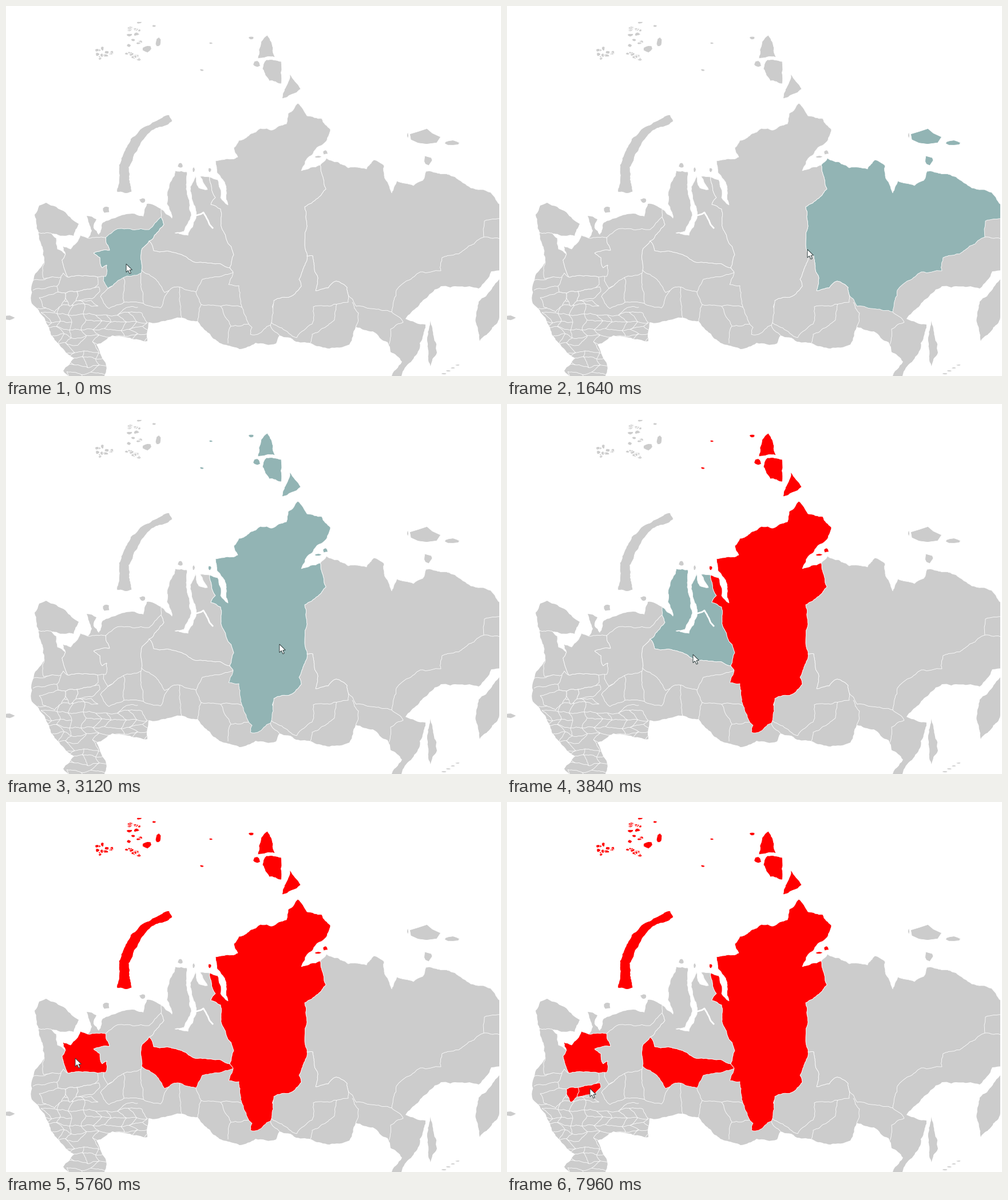
A matplotlib script for the animation above (8000 ms loop, 865x647 px).

```python
import math
import random

import matplotlib.pyplot as plt
import numpy as np
from matplotlib.animation import FuncAnimation
from matplotlib.collections import LineCollection
from matplotlib.patches import PathPatch, Polygon, Rectangle
from matplotlib.path import Path

W, H, STEP, LOOP = 865, 647, 40, 8000
GRAY, TEAL, RED = "#cccccc", "#92b4b4", "#ff0000"
THIN = 0.58

# Coast, clockwise; each arc ends where the next one starts
KOLA = [(57, 396), (50, 365), (58, 349), (70, 344), (104, 361), (127, 381), (118, 402)]
KARELIA_E = [(78, 397), (88, 406), (90, 425)]
WHITE_SEA = [(104, 434), (99, 420), (113, 425), (130, 401)]
NENETS = [(143, 406), (150, 393), (141, 367), (158, 373), (153, 388), (162, 400),
          (169, 379), (220, 363), (240, 368), (246, 346)]
YAMAL_COAST = [(271, 355), (290, 371), (281, 346), (283, 322), (296, 288), (316, 290),
               (315, 320), (324, 366), (311, 394), (295, 397), (318, 401), (332, 371),
               (327, 344), (322, 316), (331, 297), (337, 318), (352, 321), (339, 298)]
YENISEI = [(356, 299), (370, 304), (375, 335), (388, 348), (382, 308), (369, 292)]
TAYMYR = [(366, 271), (405, 264), (398, 248), (407, 235), (445, 214), (465, 217),
          (490, 206), (493, 188), (510, 170), (526, 192), (552, 197), (567, 216),
          (560, 236), (526, 267), (516, 288)]
YAKUT_COAST = [(549, 278), (560, 266), (598, 283), (630, 285), (643, 269), (661, 280),
               (661, 297), (674, 327), (683, 306), (712, 314), (728, 305), (734, 289),
               (775, 295), (812, 318), (847, 326)]
PACIFIC = [(866, 350), (866, 463), (848, 464), (826, 494), (760, 490), (740, 504),
           (698, 547), (733, 557), (722, 601), (690, 650), (672, 650), (692, 622)]
SOUTH = [(672, 605), (667, 588), (641, 569), (611, 561), (600, 592), (565, 599),
         (507, 587), (478, 576), (472, 590), (436, 589), (408, 600), (363, 582),
         (335, 551), (307, 545), (249, 553), (247, 586), (186, 576), (158, 592),
         (174, 624), (172, 650), (112, 650), (100, 638), (119, 616), (85, 584),
         (67, 545), (45, 520)]
FINNISH = [(47, 482), (67, 448)]

# Inner borders
TUNDRA_W = [(356, 299), (366, 335), (358, 347), (375, 355), (376, 380), (398, 435), (391, 458)]
STEPPE_W = [(397, 466), (389, 487), (407, 489), (416, 538), (430, 562), (427, 574),
            (440, 574), (462, 558)]
ANGARA = [(468, 515), (497, 508), (516, 490), (512, 478), (526, 437)]
ANABAR = [(526, 437), (522, 415), (526, 385), (522, 351), (545, 336), (559, 320), (549, 278)]
LENA = [(536, 437), (545, 476), (541, 498), (563, 493), (577, 481), (596, 492)]
BAIKAL = [(598, 505), (598, 518), (565, 525), (537, 526), (535, 556), (508, 580),
          (482, 563), (460, 551)]
STANOVOY = [(866, 370), (836, 376), (835, 404), (800, 427), (762, 440), (760, 463),
            (724, 465), (682, 497), (674, 535), (612, 525), (598, 505)]
OB_N = [(250, 411), (258, 428), (300, 433), (325, 446), (375, 451), (391, 458)]
OB_S = [(397, 466), (343, 478), (332, 500), (300, 491), (277, 501), (262, 478)]
URAL_S = [(237, 462), (238, 424)]
URAL_N = [(250, 411), (276, 382), (271, 369)]
KOMI_W = [(176, 453), (168, 458), (164, 440), (153, 432), (181, 427), (174, 405)]
KOMI_N = [(192, 391), (250, 391)]
KOMI_S = [(236, 467), (212, 472), (178, 494), (170, 480)]
ONEGA = [(98, 444), (104, 434)]
DVINA = [(174, 473), (160, 474), (108, 474)]
VOLOGDA = [(148, 495), (161, 487), (160, 474), (108, 474), (100, 467), (89, 490), (91, 500)]
VOLGA = [(124, 499), (126, 506), (122, 516)]
YAROSLAVL = [(111, 525), (104, 511), (104, 502)]
KOSTROMA = [(150, 512), (164, 499), (162, 491), (148, 495)]
TVER = [(104, 502), (91, 500), (58, 510), (64, 526), (85, 535), (104, 511)]
KIROV = [(178, 494), (205, 474), (206, 518), (180, 529), (165, 508)]
BORDERS = [
    [(47, 480), (100, 467)],
    [(47, 497), (89, 490)],
    [(236, 467), (240, 520), (270, 528), (285, 498)],
    [(206, 518), (240, 520)],
    [(303, 491), (307, 545)],
    [(332, 500), (341, 522), (335, 551)],
    [(341, 522), (375, 525), (414, 527)],
    [(375, 525), (393, 560), (424, 556)],
    [(393, 560), (388, 590)],
    [(462, 558), (478, 576)],
    [(578, 521), (574, 549), (535, 574), (530, 594)],
    [(605, 518), (616, 537), (611, 561)],
    [(674, 535), (694, 553), (672, 565), (667, 597)],
    [(835, 404), (866, 408)],
]
ESTUARY = [(328, 366), (345, 361), (361, 388)]

# Islands
KAMCHATKA = [(870, 472), (826, 517), (821, 545), (828, 586), (858, 555)]
SAKHALIN = [(741, 550), (753, 606), (741, 630), (737, 590)]
NORTH_ISLE = [(457, 51), (470, 90), (440, 92), (446, 62)]
BOLD_ISLE = [(455, 94), (481, 97), (481, 136), (460, 131), (448, 110)]
FAR_ISLE = [(496, 119), (515, 145), (482, 162)]
NOVAYA = np.array([(288, 196, 6), (250, 214, 6), (226, 238, 10), (206, 280, 9), (207, 325, 13)])


def rough(points):
    """Fractal line through the points, the same from either direction."""
    def jag(a, b):
        length = math.dist(a, b)
        if length < 5:
            return [a] if length else []
        (x0, y0), (x1, y1) = sorted((a, b))
        rng = random.Random(x0 * 7919 + y0 * 104729 + x1 * 31 + y1)
        d = min(0.1, 2.2 / length) * rng.uniform(-1, 1)
        mid = ((x0 + x1) / 2 - d * (y1 - y0), (y0 + y1) / 2 + d * (x1 - x0))
        return jag(a, mid) + jag(mid, b)

    return [p for a, b in zip(points, points[1:]) for p in jag(a, b)] + [points[-1]]


def area(*arcs):
    points = [p for arc in arcs for p in arc]
    return Path(rough(points + points[:1]), closed=True)


def islet(x, y, rx, ry):
    rng = random.Random(x * 1000 + y)
    ring = []
    for k in range(9):
        r, a = rng.uniform(0.7, 1.2), k * math.tau / 9
        ring.append((x + r * rx * math.cos(a), y + r * ry * math.sin(a)))
    return Path(ring + ring[:1], closed=True)


def ribbon(spine):
    """Outline of a bent strip given as centre points with half widths."""
    slope = np.gradient(spine[:, :2], axis=0)
    normal = slope[:, ::-1] * (-1, 1) / np.hypot(*slope.T)[:, None]
    side = normal * spine[:, 2:]
    ring = np.vstack([spine[:, :2] + side, (spine[:, :2] - side)[::-1]])
    return area([tuple(p) for p in ring.tolist()])


def scatter(count, x, y, sx, sy, seed):
    rng = random.Random(seed)
    return [islet(x + rng.uniform(-sx, sx), y + rng.uniform(-sy, sy),
                  rng.uniform(2, 6), rng.uniform(2, 4)) for _ in range(count)]


def mesh():
    """Small western provinces as a jittered brick pattern."""
    rng = random.Random(5)
    node = {(i, j): (42 + 22 * i + 11 * (j % 2) + rng.uniform(-5, 5),
                     512 + 13 * j + rng.uniform(-4, 4))
            for i in range(10) for j in range(12)}
    lines = []
    for (i, j), p in node.items():
        if p[0] > 150 and p[1] < 527:
            continue
        for key in ((i + 1, j), (i, j + 1)):
            if key in node and rng.random() < 0.88:
                lines.append(rough([p, node[key]]))
    return lines


land = area(KOLA, KARELIA_E, WHITE_SEA, NENETS, YAMAL_COAST, YENISEI, TAYMYR,
            YAKUT_COAST, PACIFIC, SOUTH, FINNISH)
regions = {
    "kirov": [area(KIROV)],
    "tver": [area(TVER)],
    "karelia": [area(KARELIA_E, ONEGA[::-1], [(108, 474), (66, 477)], FINNISH[1:], KOLA[:1])],
    "komi": [area(KOMI_N, URAL_N[::-1], URAL_S[::-1], KOMI_S, KOMI_W)],
    "yakutia": [area(YAKUT_COAST, PACIFIC[:1], STANOVOY, LENA[::-1], ANABAR),
                islet(731, 229, 25, 14), islet(779, 239, 14, 5), islet(737, 270, 9, 8)],
    "irkutsk": [area(ANGARA, LENA, BAIKAL)],
    "yamal": [area(YAMAL_COAST, TUNDRA_W, OB_N[::-1], URAL_N)],
    "yugra": [area(OB_N, OB_S, URAL_S)],
    "vologda": [area(VOLOGDA, YAROSLAVL[-1:], VOLGA[:1])],
    "yaroslavl": [area(VOLGA, YAROSLAVL)],
    "kostroma": [area(VOLGA, KOSTROMA)],
    "arkhangelsk": [area(WHITE_SEA, NENETS[:1], KOMI_W[::-1], DVINA, ONEGA), ribbon(NOVAYA),
                    islet(266, 64, 6, 8), islet(246, 75, 8, 7), islet(233, 29, 4, 2),
                    islet(259, 35, 4, 2), *scatter(22, 222, 66, 14, 29, 3),
                    *scatter(11, 172, 82, 14, 10, 8)],
    "krasnoyarsk": [area(YENISEI, TAYMYR, ANABAR[::-1], ANGARA[::-1], STEPPE_W[::-1],
                         TUNDRA_W[::-1]),
                    area(NORTH_ISLE), area(BOLD_ISLE), area(FAR_ISLE), islet(438, 101, 7, 5),
                    islet(428, 56, 5, 3), islet(358, 65, 4, 2), islet(342, 112, 4, 2),
                    islet(558, 256, 5, 4), islet(545, 264, 6, 2), islet(356, 287, 3, 4)],
}
loose = [area(KAMCHATKA), area(SAKHALIN), islet(175, 356, 6, 6), islet(305, 279, 5, 4),
         islet(238, 340, 5, 4), islet(328, 286, 2, 4), islet(702, 226, 1, 4),
         islet(5, 545, 9, 4), *(islet(765 + 8 * i, 643 - 5 * i, 4, 1) for i in range(4))]
clicks = {"krasnoyarsk": 3440, "yugra": 4400, "arkhangelsk": 5760,
          "yaroslavl": 7440, "kostroma": 7960}

# Pointer track: ms, x, y
TRACK = np.array([
    (0, 210, 451), (520, 210, 451), (1160, 413, 433), (1360, 450, 424),
    (1400, 450, 424), (1880, 600, 430), (2240, 591, 500), (2400, 557, 518),
    (2560, 557, 518), (3360, 456, 393), (3560, 456, 393), (3840, 325, 438),
    (4240, 250, 459), (4360, 250, 459), (4640, 188, 500), (4920, 131, 494),
    (5200, 108, 484), (5360, 96, 455), (5560, 121, 448), (6560, 121, 448),
    (7040, 94, 512), (7360, 113, 508), (7400, 113, 508), (7880, 145, 501),
    (8000, 145, 501)], float)


def glide(t, ks, vs):
    """Monotone cubic interpolation: smooth, without overshoot at rests."""
    h = np.diff(ks)
    d = np.diff(vs) / h
    m = np.zeros(len(ks))
    same = d[:-1] * d[1:] > 0
    m[1:-1][same] = 2 * d[:-1][same] * d[1:][same] / (d[:-1] + d[1:])[same]
    i = min(np.searchsorted(ks, t, "right") - 1, len(h) - 1)
    u = (t - ks[i]) / h[i]
    return (vs[i] + h[i] * m[i] * u * (1 - u) ** 2 - h[i] * m[i + 1] * u * u * (1 - u)
            + (vs[i + 1] - vs[i]) * u * u * (3 - 2 * u))


fig = plt.figure(figsize=(W / 100, H / 100), dpi=100, facecolor="white")
ax = fig.add_axes([0, 0, 1, 1])
ax.set_xlim(0, W)
ax.set_ylim(H, 0)
ax.axis("off")

ground = ax.add_patch(PathPatch(land, fc=GRAY, ec="none", zorder=1))
for shape in loose:
    ax.add_patch(PathPatch(shape, fc=GRAY, ec="none", zorder=1))
lines = LineCollection([rough(b) for b in BORDERS] + mesh(), colors="white",
                       linewidths=THIN, zorder=2)
ax.add_collection(lines)
lines.set_clip_path(ground)
patches = {name: ax.add_patch(PathPatch(Path.make_compound_path(*shapes), fc=GRAY,
                                        ec="white", lw=THIN, zorder=3))
           for name, shapes in regions.items()}
ax.plot(*zip(*rough(ESTUARY)), color="white", lw=2, zorder=4)
ax.add_patch(Rectangle((862, 0), 3, H, fc="white", ec="none", zorder=5))

ARROW = np.array([(0, 0), (0, 14.5), (3.4, 11.4), (6, 17), (8.4, 16), (6, 10.6), (10.4, 10.3)])
pointer = ax.add_patch(Polygon(ARROW, fc="white", ec="#2b3b3b", lw=0.7, zorder=6))


def update(frame):
    t = frame * STEP
    pos = [glide(t, TRACK[:, 0], TRACK[:, k]) for k in (1, 2)]
    hovered = next((n for n in reversed(regions) if regions[n][0].contains_point(pos)), None)
    for name, patch in patches.items():
        chosen = t >= clicks.get(name, LOOP)
        patch.set_facecolor(RED if chosen else TEAL if name == hovered else GRAY)
    pointer.set_xy(ARROW + pos)
    return [*patches.values(), pointer]


anim = FuncAnimation(fig, update, frames=LOOP // STEP, interval=STEP, repeat=True,
                     repeat_delay=0)
plt.show()
```
